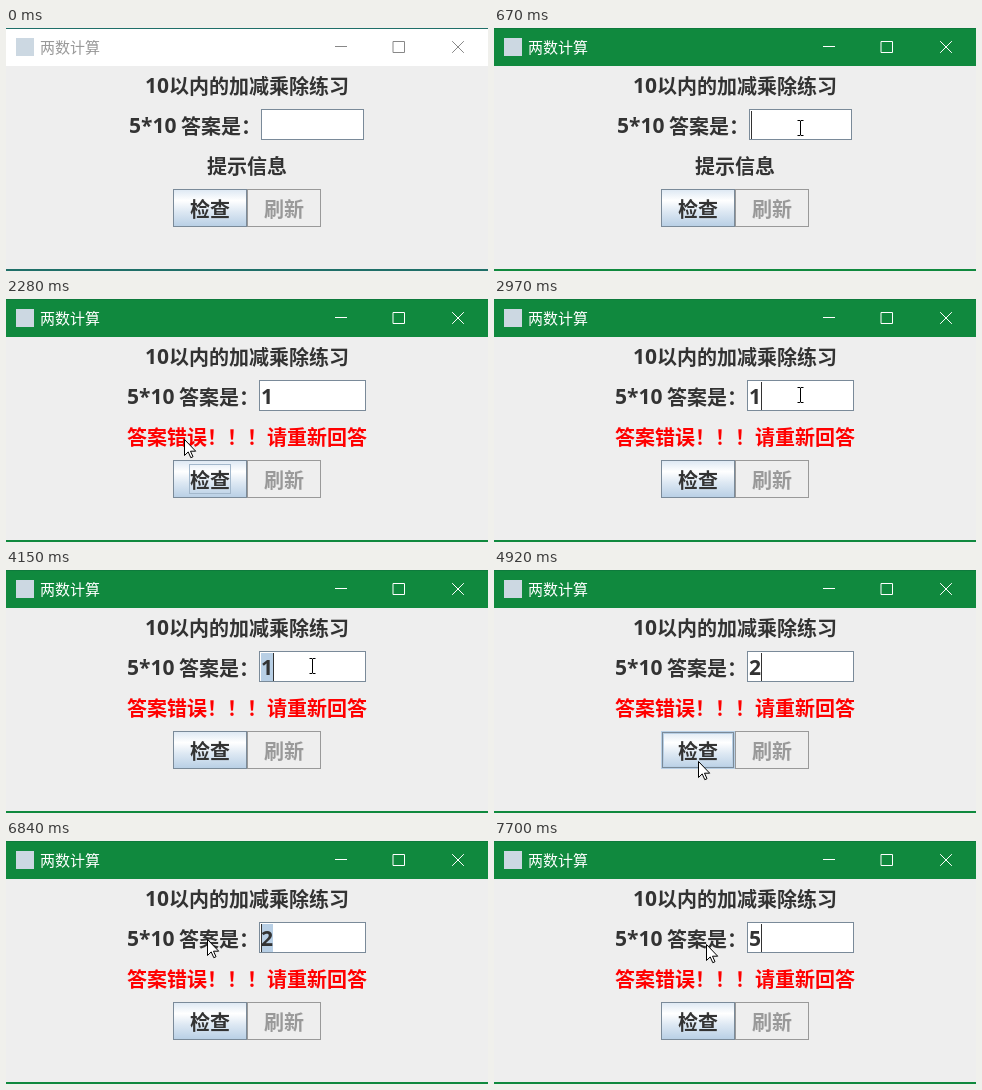
Animation, 482 px wide and 243 px high, one loop 8000 ms. Source, as an HTML page:

```html
<!DOCTYPE html>
<html lang="zh-CN">
<head>
<meta charset="utf-8">
<style>
  html, body { margin: 0; width: 100%; height: 100%; overflow: hidden; }
  svg { display: block; }
  text { font: 700 20px "Noto Sans CJK SC", "Noto Sans CJK", sans-serif; fill: #333; white-space: pre; }
  text.latin { font: 700 21px "Open Sans", sans-serif; }
  #title { font-weight: 400; font-size: 15px; }
  .line { fill: none; stroke: #7a8a99; }
  .soft { fill: none; stroke: #b8cfe5; }
</style>
</head>
<body>
<svg width="482" height="243" viewBox="0 0 482 243">
  <defs>
    <linearGradient id="ocean" x2="0" y2="1">
      <stop stop-color="#dde8f3"/><stop offset=".3" stop-color="#fff"/>
      <stop offset=".6" stop-color="#dde8f3"/><stop offset="1" stop-color="#b8cfe5"/>
    </linearGradient>
  </defs>
  <rect width="482" height="243" fill="#eee"/>
  <rect id="bar" width="482" height="38"/>
  <rect id="top" width="482" height="1"/>
  <rect id="bottom" y="241" width="482" height="2"/>
  <rect x="10" y="10" width="18" height="18" fill="#ccd8e2"/>
  <text id="title" x="34" y="25">两数计算</text>
  <path id="controls" fill="none" stroke-linecap="square" d="M329.5 18.5h11M387.5 13.5h11v11h-11zM446.5 13.5l11 11M457.5 13.5l-11 11"/>

  <text class="latin" x="139" y="65">10</text><text x="163" y="66">以内的加减乘除练习</text>
  <g id="question">
    <text class="latin" x="123" y="105">5*10</text><text x="175" y="106">答案是：</text>
    <rect id="box" x="255.5" y="81.5" height="30" fill="#fff" stroke="#7a8a99"/>
    <rect id="selection" x="257" y="83" width="12" height="28" fill="#b8cfe5"/>
    <text id="answer" class="latin" x="257" y="105"></text>
    <rect id="caret" y="83" width="1" height="28" fill="#333"/>
  </g>
  <text id="message" x="241" y="146" text-anchor="middle"></text>

  <rect id="check" x="167.5" y="161.5" width="73" height="37" stroke="#7a8a99"/>
  <g id="hover">
    <rect class="soft" x="167.5" y="161.5" width="73" height="37"/>
    <rect class="line" x="168.5" y="162.5" width="71" height="35"/>
    <rect class="soft" x="169.5" y="163.5" width="69" height="33"/>
  </g>
  <text x="184" y="189">检查</text>
  <rect id="ring" x="183.5" y="165.5" width="41" height="29" fill="none" stroke="#a3b8cc"/>
  <rect x="241.5" y="161.5" width="73" height="37" fill="none" stroke="#999"/>
  <text x="258" y="189" style="fill:#999">刷新</text>

  <g id="mouse">
    <path id="arrow" fill="#fff" stroke="#000" d="M.5 .5V16.5l3.7-3.6 2.6 5.8 2.2-1-2.5-5.5h5.2z"/>
    <path id="beam" transform="translate(.5)" fill="none" stroke="#000" d="M-3 -7.5h2.5l.5.5.5-.5H3M-3 7.5h2.5l.5-.5.5.5H3M0 -7V7"/>
  </g>
</svg>
<script>
const LOOP = 8000, ACTIVATE = 590, WRONG = 1700;
const el = id => document.getElementById(id);
const set = (id, attrs) => { for (const k in attrs) el(id).setAttribute(k, attrs[k]); };
const show = (id, on) => set(id, { visibility: on ? 'visible' : 'hidden' });
const within = (t, spans) => spans.some(([a, b]) => t >= a && t < b);

// time, x, y of the pointer
const path = [
  [70, 400, 243], [670, 306, 100], [820, 306, 102], [900, 306, 101], [1050, 306, 101],
  [1360, 222, 166], [1520, 207, 188], [1980, 207, 188], [2280, 178, 140], [2740, 300, 100],
  [2820, 306, 95.5], [4300, 306, 95.5], [4700, 202, 203], [4920, 204, 191], [5060, 204, 191],
  [5450, 300, 97], [5690, 292, 101], [5920, 292, 101], [6320, 254, 111], [6690, 219, 99],
  [6760, 202, 99], [6840, 201, 98], [6990, 212, 103]
];
// time, typed text, selected, caret offset (-1: off)
const field = [
  [0, '', 0, -1], [ACTIVATE, '', 0, 0], [1050, '1', 0, 12], [1600, '1', 0, -1],
  [2970, '1', 0, 12], [3140, '1', 1, 12], [3600, '1', 1, -1], [4150, '1', 1, 12],
  [4260, '2', 0, 12], [4990, '2', 0, -1], [5690, '2', 0, 12], [6250, '2', 1, 0],
  [7220, '2', 1, -1], [7700, '5', 0, 12]
];
const presses = [[1600, WRONG], [4990, 5060]];
const focused = [[1600, 2970], [4990, 5690]];
const dragging = [[5920, 6730]];

function pointer(t) {
  const i = path.findLastIndex(p => p[0] <= t);
  if (i < 0) return [-50, -50];
  const [t0, x0, y0] = path[i], [t1, x1, y1] = path[i + 1] || [LOOP, x0, y0];
  const k = (t - t0) / (t1 - t0);
  return [x0 + (x1 - x0) * k, y0 + (y1 - y0) * k];
}

function draw(t) {
  const active = t >= ACTIVATE, wrong = t >= WRONG;
  set('bar', { fill: active ? '#10893e' : '#fff' });
  set('top', { fill: active ? '#0e7a3c' : '#1f6f68' });
  set('bottom', { fill: active ? '#10893e' : '#1f6f68' });
  set('controls', { stroke: active ? '#fff' : '#888' });
  el('title').style.fill = active ? '#fff' : '#999';

  const [, text, selected, caret] = field.findLast(f => f[0] <= t);
  set('question', { transform: `translate(${wrong ? -2 : 0})` });
  set('box', { width: wrong ? 106 : 102 });
  el('answer').textContent = text;
  show('selection', selected);
  show('caret', caret >= 0);
  set('caret', { x: 257 + caret });
  el('message').textContent = wrong ? '答案错误！！！请重新回答' : '提示信息';
  el('message').style.fill = wrong ? '#f00' : '#333';

  const [x, y] = pointer(t), pressed = within(t, presses);
  const overButton = x >= 167 && x < 241 && y >= 161 && y < 199;
  const overField = x >= 253 && x < 361 && y >= 81 && y < 113 || within(t, dragging);
  set('check', { fill: pressed ? '#b8cfe5' : 'url(#ocean)' });
  show('hover', overButton && !pressed);
  show('ring', within(t, focused));
  show('arrow', !overField);
  show('beam', overField);
  set('mouse', { transform: `translate(${Math.round(x)} ${Math.round(y)})` });
}

const start = performance.now();
function tick() {
  draw((performance.now() - start) % LOOP);
  requestAnimationFrame(tick);
}
tick();
</script>
</body>
</html>
```
